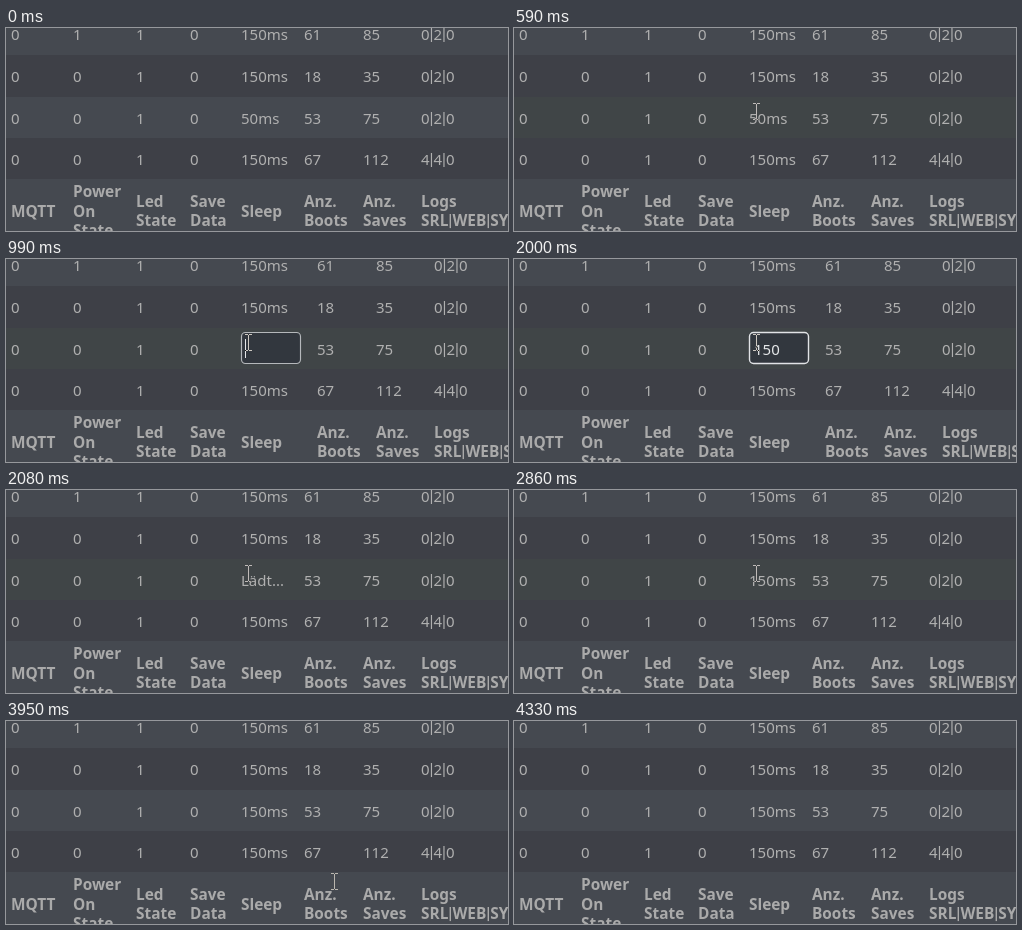
Recreate the animation shown at these times as an HTML page with a canvas. Size 502 by 203 pixels, loop 5.34 s.

```html
<!DOCTYPE html>
<html lang="de">
<head>
<meta charset="utf-8">
<style>
html, body { margin: 0; width: 100%; height: 100%; overflow: hidden; background: #454950; }
canvas { display: block; }
</style>
</head>
<body>
<canvas id="stage" width="502" height="203"></canvas>
<script>
const ctx = document.getElementById('stage').getContext('2d');
const LOOP = 5340;
const LIGHT = '#454950', DARK = '#3e4047', HOVER = '#404547';
const GREY = '#aaa', CELL = '#b0b0b0', BRIGHT = '#e4e6e8';
const columns = [5, 67, 130, 184, 235, 298, 357, 415];
const rows = [
  ['0', '1', '1', '0', '150ms', '61', '85', '0|2|0'],
  ['0', '0', '1', '0', '150ms', '18', '35', '0|2|0'],
  ['0', '0', '1', '0', '', '53', '75', '0|2|0'],
  ['0', '0', '1', '0', '150ms', '67', '112', '4|4|0']
];
const baselines = [12, 54, 96, 137];
const edges = [0, 27, 69, 110, 151];
const headers = [['MQTT'], ['Power', 'On', 'State'], ['Led', 'State'], ['Save', 'Data'],
  ['Sleep'], ['Anz.', 'Boots'], ['Anz.', 'Saves'], ['Logs', 'SRL|WEB|SYS']];

// The bar glyph comes from a font with a narrow one.
function text(str, x, y, color = CELL, bold = false) {
  ctx.fillStyle = color;
  for (const part of str.split(/(\|)/)) {
    const face = part === '|' ? '16px Roboto' : (bold ? '15.4px' : '15px') + ' "Noto Sans"';
    ctx.font = (bold ? 'bold ' : '') + face + ', sans-serif';
    ctx.fillText(part, x, y);
    x += ctx.measureText(part).width;
  }
}

function rect(color, x, y, w, h) {
  ctx.fillStyle = color;
  ctx.fillRect(x, y, w, h);
}

const mix = (a, b, k) => a + (b - a) * k;
const stepped = (t, start, end, count) =>
  Math.min(1, Math.max(0, Math.floor((t - start + 4) / (end - start) * count) / count));

function pointer(t) {
  if (t < 210 || t >= 4330) return null;
  if (t < 3640) {
    const k = 1 - (1 - stepped(t, 210, 590, 5)) ** 2;
    return [Math.round(mix(307, 242, k)), Math.round(mix(141, 83, k))];
  }
  if (t >= 4250) return [378, 197];
  if (t >= 4180) return [367, 192];
  const p = stepped(t, 3640, 4100, 6);
  const k = p * p * (3 - 2 * p);
  return [Math.round(mix(240, 359, k)), Math.round(mix(83, 187, k))];
}

function drawPointer([x, y]) {
  ctx.globalCompositeOperation = 'difference';
  rect('#fff', x, y - 7, 1, 15);
  for (const edge of [y - 8, y + 8]) {
    rect('#fff', x - 3, edge, 3, 1);
    rect('#fff', x + 1, edge, 3, 1);
  }
  ctx.globalCompositeOperation = 'source-over';
}

function drawInput(t) {
  const focus = Math.min(1, (t - 910) / 230);
  ctx.beginPath();
  ctx.roundRect(235.5, 73.5, 59, 31, 4);
  ctx.fillStyle = '#32373e';
  ctx.fill();
  ctx.strokeStyle = `rgba(225,227,230,${mix(0.6, 1, focus)})`;
  ctx.lineWidth = mix(1, 1.4, focus);
  ctx.stroke();
  const typed = '150'.slice(0, [1370, 1600, 1770].filter(at => t >= at).length);
  text(typed, 240, 96, BRIGHT);
  if (t < 2000) rect(BRIGHT, 239 + Math.round(typed.length * 8.6), 80, 1, 19);
}

function draw(now) {
  const t = now % LOOP;
  const editing = t >= 910 && t < 2080;
  const at = pointer(t);
  const sleep = t < 910 ? '50ms' : t < 2860 ? 'Lädt...' : '150ms';
  const place = i => columns[i] + (editing && i > 4 ? 13 : 0);

  rect(LIGHT, 0, 0, 502, 203);
  rows.forEach((row, r) => {
    const hover = r === 2 && at && at[1] >= edges[r] && at[1] < edges[r + 1];
    rect(hover ? HOVER : r % 2 ? DARK : LIGHT, 0, edges[r], 502, edges[r + 1] - edges[r]);
    row.forEach((value, i) => text(value, place(i), baselines[r]));
  });
  headers.forEach((lines, i) => {
    const first = 188.5 - (lines.length - 1) * 9.75;
    lines.forEach((line, n) => text(line, place(i), Math.round(first + n * 19.5), GREY, true));
  });

  if (editing) drawInput(t);
  else text(sleep, 235, 96);
  if (at) drawPointer(at);
  requestAnimationFrame(draw);
}
requestAnimationFrame(draw);
</script>
</body>
</html>
```
